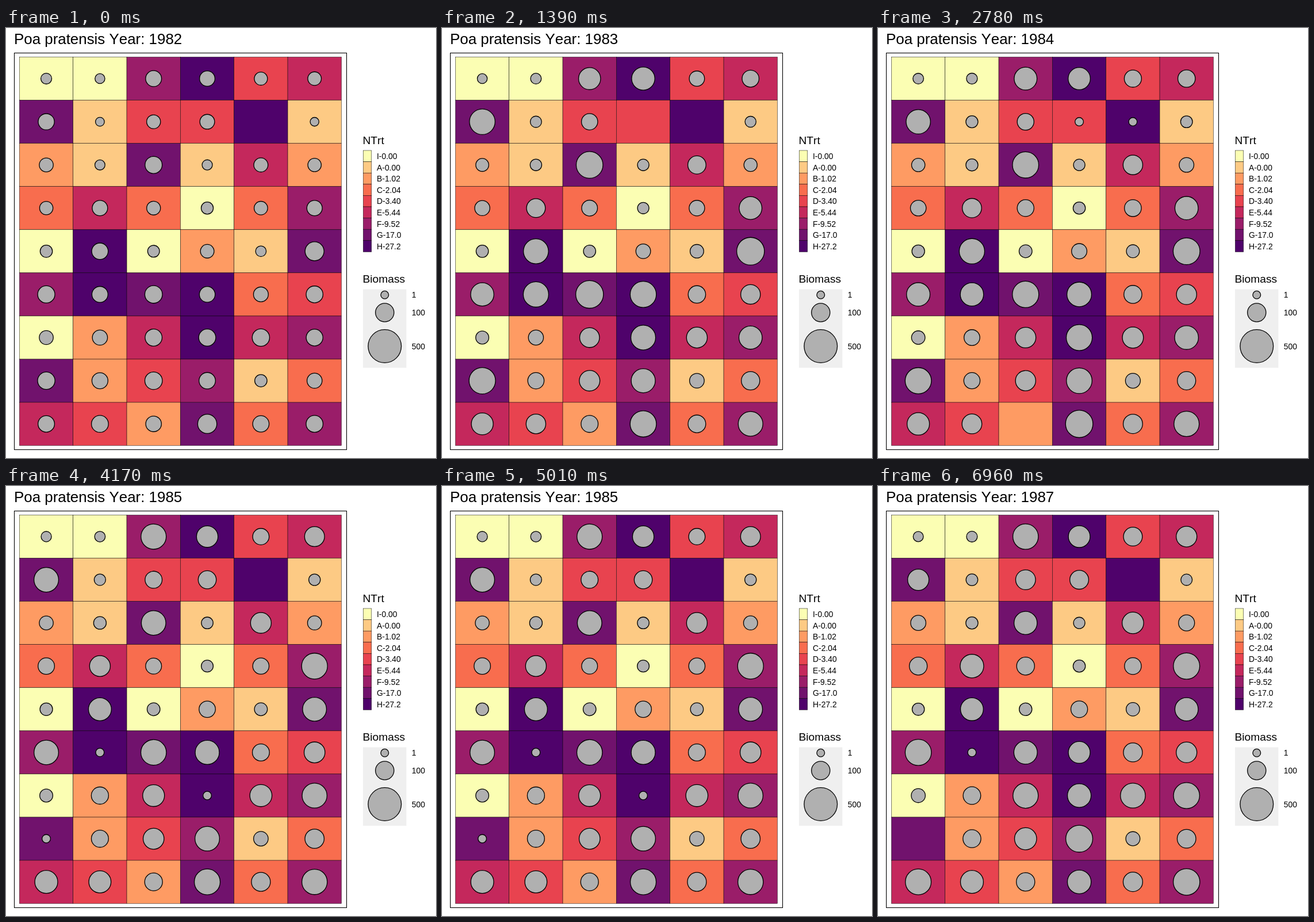
Animation, 748 px wide and 748 px high, one loop 8 s. Source, as an HTML page:

```html
<!DOCTYPE html>
<html lang="en">
<head>
<meta charset="utf-8">
<title>Biomass by plot</title>
<style>
  html, body { margin: 0; width: 100%; height: 100%; overflow: hidden; background: #fff; }
  svg { display: block; width: 100vw; height: 100vh; }
  text { font-family: "Liberation Sans", Arial, sans-serif; font-kerning: none; fill: #000; }
  .title { font-size: 25.9px; }
  .head { font-size: 19.2px; }
  .label { font-size: 13.9px; }
  .tile { stroke: #000; stroke-width: .5; }
  .dot { fill: #b0b0b0; stroke: #000; stroke-width: 1.3; }
</style>
</head>
<body>
<svg id="stage" viewBox="0 0 748 748"></svg>
<script>
const stage = document.getElementById('stage');
const LOOP = 8000, COLS = 6, ROWS = 9, STROKE = 1.3, THIN = 16;
const GRID = { x: 23.4, y: 50.5, w: 560 / COLS, h: 675.7 / ROWS };

// size: typical circle diameter in the first, second and last year
const treatments = [
  { name: 'I-0.00', fill: '#fbfeb3', size: [23, 23, 23] },
  { name: 'A-0.00', fill: '#fdca84', size: [20, 24, 24] },
  { name: 'B-1.02', fill: '#fe9b63', size: [26, 27, 30] },
  { name: 'C-2.04', fill: '#f86d4e', size: [26, 30, 32] },
  { name: 'D-3.40', fill: '#e8434f', size: [28, 33, 37] },
  { name: 'E-5.44', fill: '#c4285c', size: [28, 34, 42] },
  { name: 'F-9.52', fill: '#9a1d69', size: [30, 43, 47] },
  { name: 'G-17.0', fill: '#71126d', size: [32, 48, 40] },
  { name: 'H-27.2', fill: '#4f026b', size: [30, 45, 40] }
];
const field = 'IIFHDE GADDHA BAGAEB CECICF IHIBAG FHGHCD IBEHEF GBDFAC EDBGCF'.replace(/ /g, '');
const plots = [...field].map((key, i) => ({
  level: treatments.findIndex(t => t.name[0] === key),
  row: Math.floor(i / COLS),
  col: i % COLS
}));

// Plots without a circle (bare) or with hardly any growth (thin)
const years = [
  { start: 0, bare: [10], thin: [] },
  { start: 1390, bare: [9, 10], thin: [] },
  { start: 2780, bare: [50], thin: [9, 10] },
  { start: 4170, bare: [10], thin: [31, 39, 42] },
  { start: 5570, bare: [9], thin: [10, 42] },
  { start: 6960, bare: [10, 42], thin: [31] }
];

// Seeded noise in -1..1
function noise(seed) {
  const v = Math.sin(seed * 12.9898) * 43758.5453;
  return 2 * (v - Math.floor(v)) - 1;
}

// Growth follows treatment and year, rises down the field, and varies a little
function diameter(i, n) {
  if (years[n].bare.includes(i)) return 0;
  if (years[n].thin.includes(i)) return THIN;
  const { level, row } = plots[i];
  const [first, second, last] = treatments[level].size;
  const typical = n ? second + (last - second) * (n - 1) / 4 : first;
  const slope = level < 6 ? 0.9 : 0.3;
  return typical + slope * (row - 4) + (1 + level * .2) * noise(i + 1 + n * 60);
}

function add(tag, attrs, content = '') {
  const el = document.createElementNS('http://www.w3.org/2000/svg', tag);
  for (const key in attrs) el.setAttribute(key, attrs[key]);
  el.textContent = content;
  return stage.appendChild(el);
}
const rect = (x, y, width, height, rest) => add('rect', { x, y, width, height, ...rest });
const text = (x, y, cls, content) => add('text', { x, y, class: cls }, content);
const dot = (cx, cy, size) => add('circle', { cx, cy, r: (size - STROKE) / 2, class: 'dot' });

// Panel and plots
const title = text(14, 28, 'title', '');
rect(14.5, 43.5, 578, 690, { fill: '#fff', stroke: '#000', 'stroke-width': 1.1 });
for (const { level, row, col } of plots) {
  rect(GRID.x + col * GRID.w, GRID.y + row * GRID.h, GRID.w, GRID.h,
    { fill: treatments[level].fill, class: 'tile' });
}
const dots = plots.map(({ row, col }) =>
  dot(GRID.x + (col + .5) * GRID.w, GRID.y + (row + .5) * GRID.h, THIN));

// Colour legend
text(620.5, 202, 'head', 'NTrt');
treatments.forEach(({ name, fill }, i) => {
  const y = 213 + i * 19.6;
  rect(621.4, y, 14.4, 19.6, { fill, class: 'tile' });
  text(645, y + 14.9, 'label', name);
});

// Size legend
text(620.5, 443.3, 'head', 'Biomass');
rect(621, 454.5, 75.5, 136.5, { fill: '#efefef' });
[[1, 464.3, 15], [100, 495, 33.5], [500, 553.5, 59]].forEach(([value, y, size]) => {
  dot(658.8, y, size);
  text(705.7, y + 5, 'label', value);
});

let shown = -1;
function draw(now) {
  const n = years.findLastIndex(y => now % LOOP >= y.start);
  if (n === shown) return;
  shown = n;
  title.textContent = `Poa pratensis Year: ${1982 + n}`;
  dots.forEach((el, i) => {
    const size = diameter(i, n);
    el.setAttribute('r', Math.max(0, (size - STROKE) / 2));
    el.setAttribute('visibility', size ? 'visible' : 'hidden');
  });
}
function tick() {
  draw(performance.now());
  requestAnimationFrame(tick);
}
tick();
</script>
</body>
</html>
```
